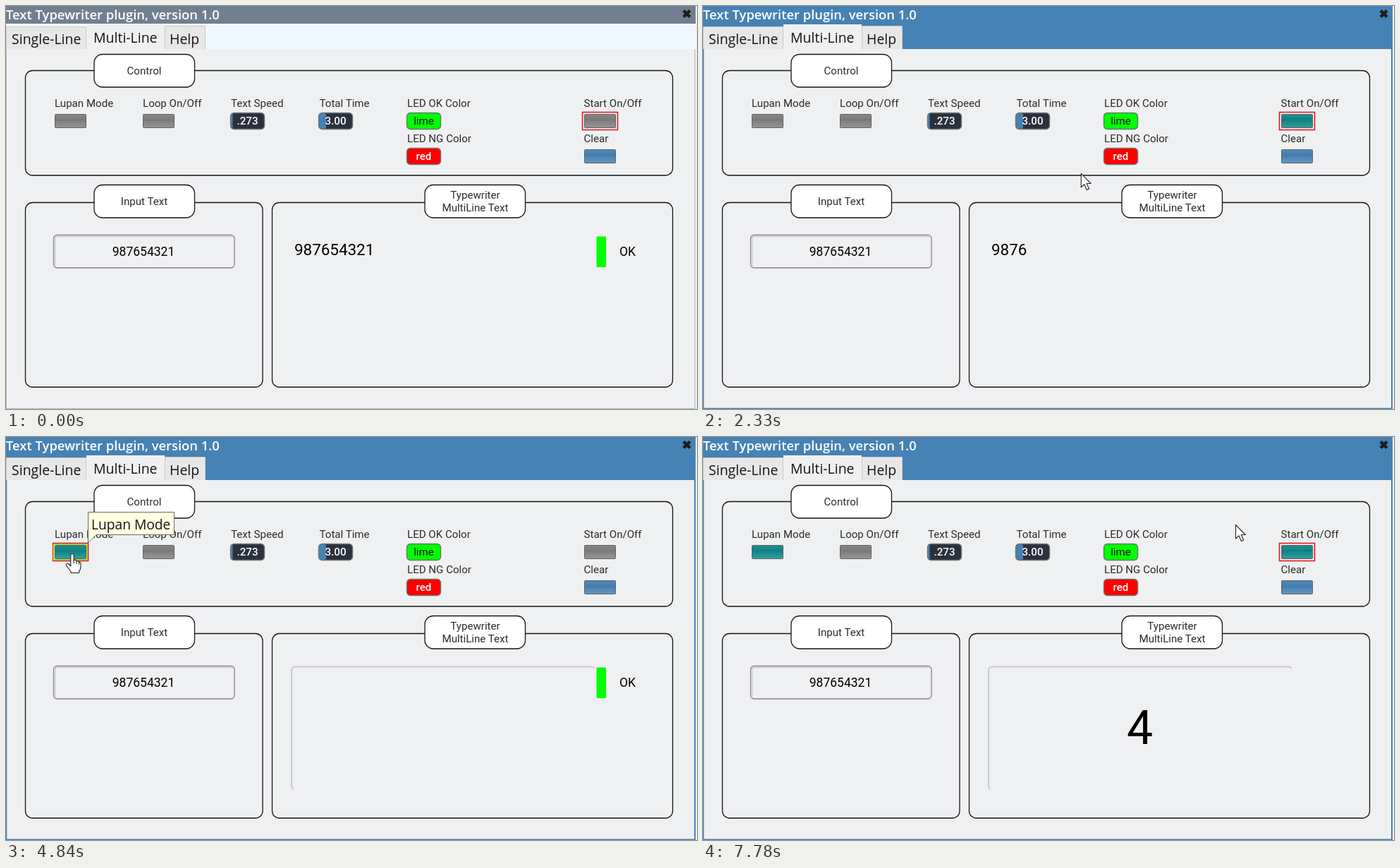
Recreate the animation shown at these times as an HTML page. Size 980 px wide and 571 px high, loop 8000 ms.

```html
<!DOCTYPE html>
<html lang="en">
<head>
<meta charset="utf-8">
<title>Text Typewriter plugin</title>
<style>
  html, body { margin: 0; height: 100%; overflow: hidden; background: #eff0f2; }
  svg { display: block; width: 100vw; height: 100vh; }
  text { font: 15.1px Roboto, sans-serif; fill: #2b2b2b; }
  .ui { font: 19.5px "Open Sans", "Noto Sans", sans-serif; fill: #151515; }
  .title { font-weight: 600; font-size: 18.4px; fill: #fff; }
  .tip text { font-size: 19.2px; }
  .tip path { fill: #ffffe1; stroke: #686868; }
  .mid { text-anchor: middle; }
  .value { font-weight: 500; fill: #fff; }
  .dark { fill: #111; }
  .panel { fill: none; stroke: #151515; stroke-width: 1.3; }
  .plate { fill: #fff; stroke: #151515; stroke-width: 1.3; }
  .entry { font-size: 17.5px; fill: #000; }
  .cursor path { fill: #fff; stroke: #222; stroke-width: 1.1; stroke-linejoin: round; }
</style>
</head>
<body>
<svg viewBox="0 0 980 571" preserveAspectRatio="none">
  <defs>
    <linearGradient id="gloss" x2="0" y2="1">
      <stop offset="0" stop-color="#fff" stop-opacity=".06"/>
      <stop offset=".45" stop-color="#000" stop-opacity=".06"/>
      <stop offset=".55" stop-color="#fff" stop-opacity=".02"/>
      <stop offset="1" stop-color="#fff" stop-opacity=".16"/>
    </linearGradient>
  </defs>

  <rect width="980" height="571" fill="#eff0f2"/>
  <rect id="strip" y="25" width="978" height="36"/>
  <rect id="titleBar" width="978" height="25"/>
  <path id="edge" d="M977 61V570.5H0M.3 571V61" fill="none"/>
  <text class="ui title" x="0" y="19">Text Typewriter plugin, version 1.0</text>
  <path d="M961 6.5L970 15.5M970 6.5L961 15.5" stroke="#1c1c1c" stroke-width="4.4"/>

  <g stroke="#c9cacc" fill="#e7e7e8">
    <path d="M.5 61V29.5H113.5V61M225.5 61V28.5H282.5V61"/>
  </g>
  <rect x="114" y="26" width="111" height="36" fill="#eff0f2"/>
  <text class="ui" x="8" y="54">Single-Line</text>
  <text class="ui" x="124" y="52">Multi-Line</text>
  <text class="ui" x="232" y="54">Help</text>

  <g id="form"></g>

  <path id="outBox" d="M408 499Q405 498 405 494V331Q405 325.500 411 325.500H830Q833 325.500 834.500 328"
        fill="none" stroke="#c9cacd" stroke-width="2"/>
  <text id="typed" x="409" y="352.500" style="font-size:22.4px;fill:#000"></text>
  <text id="single" class="mid" x="619.5" y="434.500" style="font-size:66px;fill:#000"></text>
  <g id="result">
    <rect x="837.5" y="326.5" width="13.500" height="43.500" fill="#0f0"/>
    <text class="entry" x="870" y="354">OK</text>
  </g>

  <rect id="focus" y="150.5" width="50" height="25" fill="none" stroke="#e3161c" stroke-width="1.6"/>
  <rect id="hover" y="152" width="47.500" height="22" fill="none" stroke="#a6d12f" stroke-width="1.8"/>

  <g class="tip" id="tipStartLeft">
    <path d="M723.500 106.500H867.500V149L856 138.500H723.500Z"/>
    <text class="ui" x="728" y="131">Start Mutil Line</text>
  </g>
  <g class="tip" id="tipLupan">
    <path d="M116.500 106.500H238.500V138.500H128L116.500 150Z"/>
    <text class="ui" x="121" y="131">Lupan Mode</text>
  </g>
  <g class="tip" id="tipStartRight">
    <path d="M867.500 106.500H1012V138.500H879L867.500 150Z"/>
    <text class="ui" x="872" y="131">Start Mutil Line</text>
  </g>

  <circle id="halo" r="14" fill="#f5ea28" fill-opacity=".72"/>
  <g class="cursor" id="arrow">
    <path d="M.5 .5V20L5 15.800L8.500 23.500L11.700 22L8.300 14.500H14.300Z"/>
  </g>
  <g class="cursor" id="hand">
    <path d="M-2.200 2Q0 -1 2.200 2V9.500Q6 8.500 6 11Q9.500 10 9.500 12.500Q12 12 12 14.500V19Q12 23 9.500 25.500V27.500H-2V25.500Q-5 22 -8.500 17Q-9 13.500 -5.500 14.500L-2.200 18Z"/>
    <path d="M2.200 9V14M6 11V15M9.500 12V15.500"/>
  </g>
</svg>

<script>
const LOOP = 8000, INPUT = '987654321';
const $ = id => document.getElementById(id);
const LUPAN_X = 69, START_X = 820;

const rect = (x, y, w, h, r, attrs) =>
  `<rect x="${x}" y="${y}" width="${w}" height="${h}" rx="${r}" ${attrs}/>`;
const label = (x, y, text, cls = '') => `<text class="${cls}" x="${x}" y="${y}">${text}</text>`;
const button = (x, y, color, id = '') =>
  rect(x + .5, y + .5, 44, 19, 1, `id="${id}" fill="${color}" stroke="#5d6266"`) +
  rect(x + 1, y + 1, 43, 18, 1, 'fill="url(#gloss)"');
const pill = (x, y, color, text, cls, level = 0) =>
  rect(x + .5, y + .5, 48, 23, 5, `fill="${color}"`) +
  (level ? rect(x + 1, y + 1, level, 22, 2, 'fill="#4682b4"') : '') +
  rect(x + .5, y + .5, 48, 23, 5, 'fill="none" stroke="#70736f" stroke-width="1.4"') +
  label(x + 24.5, y + 17.3, text, 'mid ' + cls);
const panel = (x, y, w, h) => rect(x, y, w, h, 10, 'class="panel"');
const plate = (x, y) => rect(x, y, 142.5, 46.5, 12, 'class="plate"');

$('form').innerHTML = [
  panel(27.5, 91.5, 918, 148.5), panel(27.5, 278.5, 336.5, 261.5), panel(377.5, 278.5, 568, 261.5),
  plate(125, 68.5), plate(125, 253.5), plate(594, 253.5),
  label(196, 97, 'Control', 'mid'), label(196, 282, 'Input Text', 'mid'),
  label(665.5, 273, 'Typewriter', 'mid'), label(665.5, 291, 'MultiLine Text', 'mid'),
  label(69, 143, 'Lupan Mode'), label(194, 143, 'Loop On/Off'), label(319, 143, 'Text Speed'),
  label(444.5, 143, 'Total Time'), label(569, 143, 'LED OK Color'), label(569, 193, 'LED NG Color'),
  label(819.5, 143, 'Start On/Off'), label(819.5, 193, 'Clear'),
  button(LUPAN_X, 153, '#808080', 'lupan'), button(194, 153, '#808080'),
  button(START_X, 153, '#808080', 'start'), button(START_X, 203, '#4682b4'),
  pill(318, 151, '#2b303d', '.273', 'value', 2.5), pill(443, 151, '#2b303d', '3.00', 'value', 10),
  pill(568, 151, '#0f0', 'lime', 'dark'), pill(568, 201, '#f00', 'red', 'value'),
  rect(67.5, 324.5, 256.5, 46.5, 5, 'fill="none" stroke="#858587" stroke-width="1.3"'),
  '<path d="M69.5 369V330Q69.500 326.500 73 326.500H322" fill="none" stroke="#cfd0d2" stroke-width="2"/>',
  label(195, 354, INPUT, 'mid entry'),
].join('');

// Pointer path: time, x, y
const PATH = [
  [120, 922, 548], [270, 905, 400], [400, 880, 235], [540, 867, 163], [1270, 867, 163],
  [1610, 721, 170], [2060, 721, 170], [2330, 536.5, 237], [2600, 340, 225], [2880, 196, 195],
  [2920, 196, 195], [3120, 94, 165], [4860, 94, 165], [5080, 420, 215], [5320, 822, 168],
  [5870, 822, 168], [6110, 774, 125], [6270, 774, 125], [6430, 755, 124],
];
const TYPE_TIMES = [1140, 1810, 1870, 2130, 2420, 2740, 3020, 3320, 3650];
const SINGLE_TIMES = [6050, 6710, 6780, 7310, 7380, 7780];

const within = (t, from, to = LOOP) => t >= from && t < to;
const passed = (times, t) => times.filter(time => time <= t).length;
const show = (id, visible) => $(id).style.display = visible ? '' : 'none';
const set = (id, name, value) => $(id).setAttribute(name, value);

function pointerAt(t) {
  const next = PATH.findIndex(point => point[0] > t);
  if (next < 0) return PATH[PATH.length - 1].slice(1);
  if (next === 0) return PATH[0].slice(1);
  const [t0, x0, y0] = PATH[next - 1], [t1, x1, y1] = PATH[next];
  const k = (t - t0) / (t1 - t0);
  return [x0 + (x1 - x0) * k, y0 + (y1 - y0) * k];
}

function render(t) {
  const active = t >= 930;
  set('titleBar', 'fill', active ? '#4682b4' : '#708090');
  set('strip', 'fill', active ? '#4682b4' : '#f0f8ff');
  set('edge', 'stroke', active ? '#4682b4' : '#aab4be');
  set('edge', 'stroke-width', active ? 2 : 1);

  const lupanOn = t >= 4710, startOn = within(t, 1000, 4050) || t >= 5870;
  set('lupan', 'fill', lupanOn ? '#108888' : '#808080');
  set('start', 'fill', startOn ? '#108888' : '#808080');
  set('focus', 'x', (within(t, 4710, 5870) ? LUPAN_X : START_X) - 2.5);

  $('typed').textContent = lupanOn ? '' : t < 1140 ? INPUT : INPUT.slice(0, passed(TYPE_TIMES, t));
  $('single').textContent = INPUT[passed(SINGLE_TIMES, t) - 1] || '';
  show('outBox', lupanOn);
  show('result', t < 1140 || within(t, 4050, 6050));

  const tipStart = within(t, 730, 1340), tipLupan = within(t, 3320, 4900), tipAgain = within(t, 5510, 5940);
  show('tipStartLeft', tipStart);
  show('tipLupan', tipLupan);
  show('tipStartRight', tipAgain);
  show('hover', tipStart || tipLupan || tipAgain);
  set('hover', 'x', (tipLupan ? LUPAN_X : START_X) - 1.5);

  const [x, y] = pointerAt(t), visible = t >= 120;
  const onButton = y > 152 && y < 176 && [LUPAN_X, START_X].some(left => x > left - 1 && x < left + 48);
  show('arrow', visible && !onButton);
  show('hand', visible && onButton);
  show('halo', within(t, 930, 1070) || within(t, 4640, 4780) || within(t, 5580, 5870));
  for (const id of ['arrow', 'hand']) set(id, 'transform', `translate(${x} ${y})`);
  set('halo', 'transform', `translate(${x} ${y})`);
}

const begin = performance.now();
function tick() {
  render((performance.now() - begin) % LOOP);
  requestAnimationFrame(tick);
}
tick();
</script>
</body>
</html>
```
